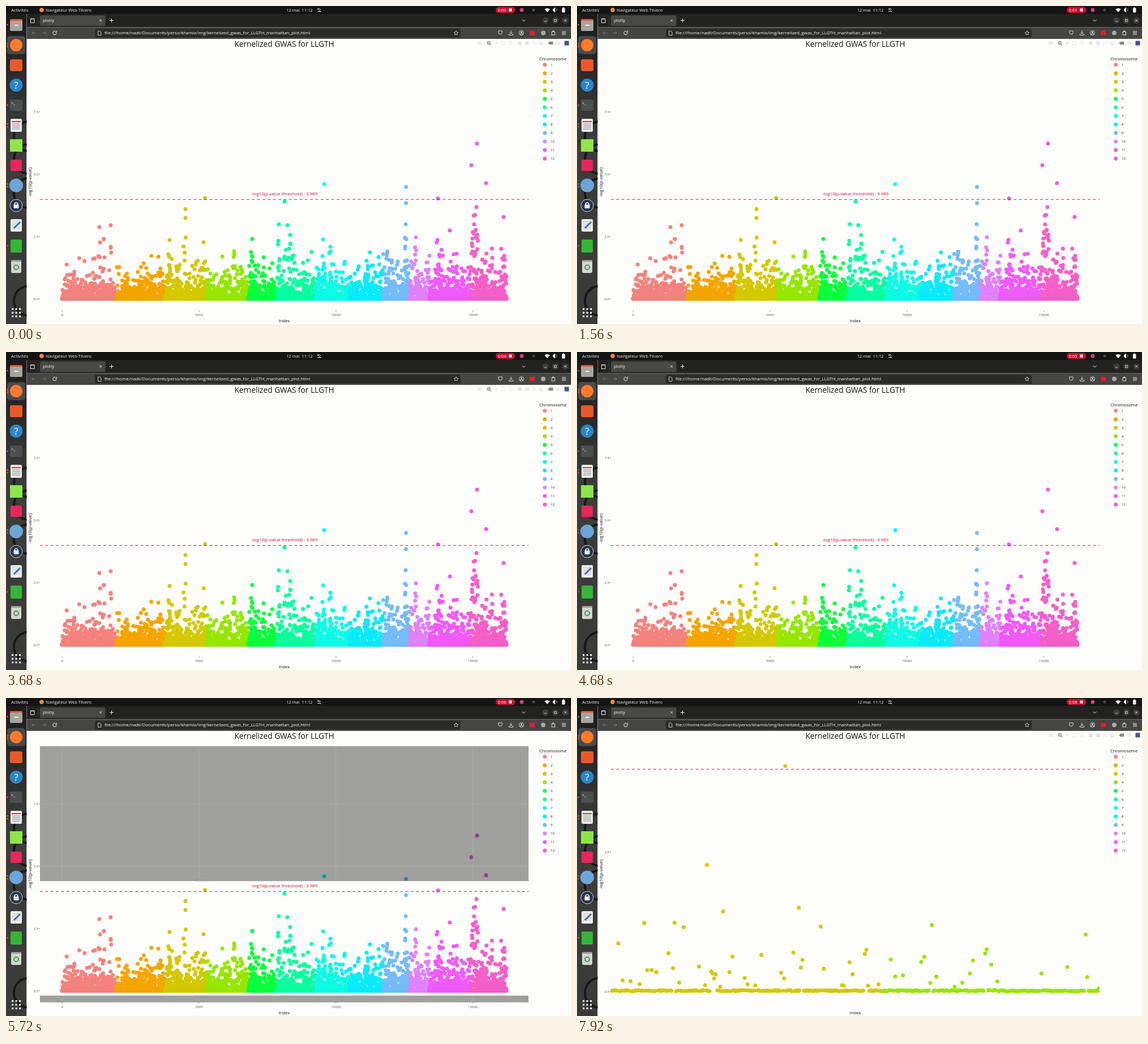
Write an HTML page with a canvas that moves like this. It is 998 px wide and 561 px high and loops after 7990 ms.

```html
<!DOCTYPE html>
<html lang="fr">
<head>
<meta charset="utf-8">
<title>Manhattan plot</title>
<style>
html, body { margin: 0; width: 998px; height: 561px; overflow: hidden; background: #fdfdfb; }
canvas { display: block; }
</style>
</head>
<body>
<canvas id="stage" width="998" height="561"></canvas>
<script>
const W = 998, H = 561, LOOP = 7990;
const SANS = '"Open Sans", "Noto Sans", sans-serif', ARIAL = '"Liberation Sans", Arial, sans-serif';
const PAPER = '#fdfdfb', RED = '#c41432';
const COLORS = ['#f4827d', '#f4a500', '#d4c800', '#96e600', '#0aff3c', '#0aff9f',
  '#0ffae6', '#0aebfa', '#73bdf8', '#e182fa', '#f05afa', '#f55fc8'];
const PLOT = { l: 60, t: 85, r: 923, b: 537 };

// Data: x is measured in overview pixels, v is -log10(p)
const EDGES = [99, 195, 281, 354.6, 428, 478, 548, 607, 666, 713, 748, 820, 885];
const MARKERS = 16260, THRESHOLD = 3.989;
const PEAKS = [[165, 2.88], [185, 2.95], [173, 2.4], [289, 2.36], [317, 3.6], [317, 3.24],
  [351.53, 4.047], [403, 1.9], [435, 2.4], [482, 2.99], [492, 3.9], [497, 2.95], [502, 2.56],
  [562, 4.6], [706.5, 4.49], [706.5, 3.84], [706, 2.99], [724, 2.47], [763, 4.03], [784, 2.74],
  [822, 5.36], [832, 6.23], [848, 4.64], [831, 3.68], [879, 3.28]];

// The two views on the data, and the band dragged between them
const OVERVIEW = { x: x => x, y: v => 516.5 - v * 43.95 };
const ZOOMED = { x: x => 60 + (x - 346) * 55.7, y: v => 517.4 - v * 98.2 };
const BAND = { l: 346, r: 361.5, t: 323 };
const DRAG = [[4830, 396], [4890, 432], [5060, 478], [5300, 511], [5540, 518], [5710, 525]];

let g;

function layer(paint) {
  const c = document.createElement('canvas');
  c.width = W; c.height = H;
  g = c.getContext('2d');
  paint();
  return c;
}
function rect(x, y, w, h, color, r = 0) {
  g.fillStyle = color;
  g.beginPath(); g.roundRect(x, y, w, h, r); g.fill();
}
function dot(x, y, color, r = 3.5) {
  g.fillStyle = color;
  g.beginPath(); g.arc(x, y, r, 0, 7); g.fill();
}
function ring(x, y, r, color, w = 1, from = 0, to = 2 * Math.PI) {
  g.strokeStyle = color; g.lineWidth = w;
  g.beginPath(); g.arc(x, y, r, from, to); g.stroke();
}
function line(color, w, ...p) {
  g.strokeStyle = color; g.lineWidth = w;
  g.beginPath();
  for (let i = 0; i < p.length; i += 2) g.lineTo(p[i], p[i + 1]);
  g.stroke();
}
function polygon(fill, stroke, points) {
  g.fillStyle = fill; g.strokeStyle = stroke; g.lineWidth = .6;
  g.beginPath();
  for (const [x, y] of points) g.lineTo(x, y);
  g.closePath(); g.fill(); g.stroke();
}
function cross(x, y, r) {
  line('#eee', .9, x - r, y - r, x + r, y + r);
  line('#eee', .9, x + r, y - r, x - r, y + r);
}
function text(s, x, y, size, color, align = 'left', font = SANS) {
  g.font = `${size}px ${font}`;
  g.textAlign = align; g.fillStyle = color;
  g.fillText(s, x, y);
}
function randomizer(seed) {
  return () => (seed = (seed * 16807) % 2147483647) / 2147483647;
}

// Most markers lie at zero; the rest decay exponentially, varying from place to place
function makeData() {
  const rnd = randomizer(4711), points = [];
  const add = (x, v) => points.push({ x, v, chr: EDGES.findIndex(e => e > x) - 1 });
  const local = Array.from({ length: 160 }, () => .55 + .8 * rnd());
  for (let i = 0; i < MARKERS; i++) {
    const x = 99 + i * 785 / MARKERS;
    const spread = (.32 + .02 * x / 99) * local[(x - 99) / 5 | 0];
    const v = rnd() < .84 ? rnd() * .02 : -Math.log(1 - rnd()) * spread;
    add(x, v < 2.1 ? v : 0);
  }
  for (const [x, top] of PEAKS) {
    add(x, top);
    for (let i = 0; i < 4; i++) add(x + 5 * (rnd() - .5), Math.min(top, 2.5) * rnd());
  }
  for (let i = 0; i < 16; i++) add(822 + 11 * rnd(), 1.6 + 1.9 * rnd());
  return points.sort((a, b) => a.chr - b.chr);
}

function paintDock() {
  g.save();
  g.beginPath(); g.rect(0, 14, 36.5, H); g.clip();
  const bg = g.createLinearGradient(0, 14, 0, H);
  bg.addColorStop(0, '#1c1a1a'); bg.addColorStop(.4, '#3c3d3a'); bg.addColorStop(1, '#3a3b38');
  rect(0, 14, 36.5, H, bg);
  for (const y of [230, 270, 330, 520]) ring(40, y, 26, '#161618', 4);
  rect(2, 53, 32, 32, '#4a4a4c', 5);
  g.restore();

  rect(7, 23, 22, 9, '#e2583a', 2); rect(7, 26, 22, 18, '#a8a5a0', 2); rect(15, 33, 7, 2, '#f2f2f2');
  dot(18, 69, '#ff7a2b', 11);
  rect(7, 94, 22, 21, '#e95a2b', 3);
  dot(18, 139.5, '#2a86c8', 11.5); text('?', 18, 145.5, 17, '#fff', 'center');
  rect(7, 165, 22, 20, '#4c4f50', 2); text('>_', 9, 174, 7, '#fff');
  rect(8, 199, 20, 23, '#ececec', 2); rect(10, 203, 16, 2, '#d33c3c');
  for (let y = 208; y < 220; y += 3) line('#8b8b8b', 1, 11, y, 25, y);
  rect(7, 235, 22, 22, '#8ee64a', 1);
  rect(8, 271, 20, 20, '#e8265c', 2);
  dot(18, 316.5, '#6da5d8', 12);
  dot(18, 352, '#27364f', 11.5); ring(18, 352, 11, '#d8dce2');
  ring(18, 350, 3, '#eee', 1.5, Math.PI, 0); rect(13.5, 350, 9, 7, '#eee', 1);
  rect(8, 376, 20, 22, '#eeeeec', 2);
  for (let y = 380; y < 395; y += 3) line('#bbb', .8, 11, y, 25, y);
  line('#3a6fc4', 3, 14, 392, 25, 381);
  rect(8, 412, 20, 23, '#35b635', 2);
  rect(9, 448, 18, 23, '#d5d5d0', 3); rect(9, 448, 18, 3, '#9b9b98', 1);
  ring(18, 461, 4, '#3e9c55', 2);
  for (let i = 0; i < 9; i++) rect(10 + i % 3 * 6.5, 533 + (i / 3 | 0) * 6.5, 3.2, 3.2, '#f3f3f3', .8);
  for (const y of [33, 66, 69, 72, 175, 208, 213, 314, 319, 423]) dot(2.7, y, '#e9562a', 1.3);
}

function paintTopBar() {
  rect(0, 0, W, 14, '#141414');
  text('Activités', 9, 9.7, 7.8, '#f2f2f2');
  dot(63, 7, '#ff8a3c', 3.8);
  text('Navigateur Web Tilvero', 70, 9.7, 7.5, '#f2f2f2');
  text('12 mai  11:12', 495, 9.7, 7.5, '#f2f2f2');
  ring(553, 7, 2.4, '#ddd', 1, Math.PI, 0);
  line('#ddd', 1, 550, 9.5, 556, 9.5); line('#ddd', .8, 550, 3.5, 556.5, 11);
  rect(865, 1.5, 34.5, 11, '#c8102e', 5.5); rect(888.5, 4.5, 5, 5, '#fff');
  dot(911, 7, '#d93a8c', 3.5);
  dot(932, 7, '#4a4a4a', 2.5);
  g.fillStyle = '#f2f2f2';
  g.beginPath(); g.moveTo(956, 11); g.arc(956, 11, 7, -2.3, -.84); g.fill();
  g.beginPath(); g.moveTo(966, 5.5); g.lineTo(970, 2.5); g.lineTo(970, 11.5); g.lineTo(966, 8.5); g.fill();
  ring(970, 7, 3, '#bbb', 1, -.9, .9);
  rect(982, 3.5, 5.5, 8, '#f2f2f2', 1); rect(983.5, 2.5, 2.5, 1.5, '#f2f2f2');
}

function paintBrowser() {
  rect(36.5, 14, W, 23.5, '#222221');
  rect(60, 16.5, 115.5, 18.5, '#484846', 2.5);
  line('#5c5c5a', .7, 57, 19, 57, 33);
  line('#e6e6e8', 1, 43, 22.5, 50, 22.5);
  g.strokeRect(43.5, 23, 6.5, 6.5);
  text('plotly', 65, 28.2, 7.8, '#fbfbfe');
  cross(167, 25.5, 2);
  line('#eee', 1, 183, 25.5, 190, 25.5); line('#eee', 1, 186.5, 22, 186.5, 29);
  line('#eee', 1, 911.5, 24, 914.5, 27, 917.5, 24);
  for (const x of [953, 970.5, 988]) dot(x, 25.5, '#3e3e3d', 5.5);
  line('#eee', .8, 951, 27, 955, 27); g.strokeRect(968.7, 23.8, 3.5, 3.5); cross(988, 25.5, 1.8);

  rect(36.5, 37.5, W, 20.5, '#454543');
  for (const [x, d] of [[49, -1], [67, 1]]) {
    line('#777775', 1, x - 3.5, 47.5, x + 3.5, 47.5);
    line('#777775', 1, x + d * .5, 44.5, x + d * 3.5, 47.5, x + d * .5, 50.5);
  }
  ring(86, 47.5, 3.2, '#eee', 1, 0, 5.2); line('#eee', 1, 89.4, 43.5, 89.4, 46.2, 86.8, 46.2);
  rect(157, 40, 646, 15.5, '#2a2a29', 2.5);
  line('#ddd', .9, 162.5, 44, 166, 44, 168, 46, 168, 51.5, 162.5, 51.5, 162.5, 44);
  text('file:///home/nadil/Documents/perso/khamix/img/kernelized_gwas_for_LLGTH_manhattan_plot.html',
    174, 50.3, 7.85, '#fbfbfe');
  const star = [];
  for (let i = 0; i < 11; i++) {
    const a = i * Math.PI / 5 - Math.PI / 2, r = i % 2 ? 1.8 : 4;
    star.push(795 + r * Math.cos(a), 47.7 + r * Math.sin(a));
  }
  line('#ddd', .8, ...star);
  ring(873, 46.5, 3.3, '#ddd', 1, 0, Math.PI); line('#ddd', 1, 869.7, 46.5, 869.7, 44, 876.3, 44, 876.3, 46.5);
  line('#ddd', 1, 892, 43.5, 892, 49, 889.5, 46.8); line('#ddd', 1, 892, 49, 894.5, 46.8);
  line('#ddd', 1, 888.5, 49, 888.5, 51.3, 895.5, 51.3, 895.5, 49);
  ring(910.5, 47.5, 4, '#ddd'); dot(910.5, 46.5, '#ddd', 1.4); ring(910.5, 50.5, 2.2, '#ddd', 1, Math.PI, 0);
  rect(925, 43.5, 9, 8, '#e01f2d', 1.5);
  dot(949, 47.5, '#a9a9a9', 4);
  g.strokeRect(964, 45.5, 5.5, 5.5); dot(966.5, 44.7, '#ddd', 1.5);
  for (const y of [45, 47.5, 50]) line('#eee', 1, 982, y, 989, y);
}

function paintFrame() {
  rect(0, 0, W, H, PAPER);
  paintDock();
  paintTopBar();
  paintBrowser();
  text('Kernelized GWAS for LLGTH', 491.5, 71.7, 13.7, '#111', 'center');
  text('Index', 491.5, 557.6, 7.6, '#111', 'center');
  g.save();
  g.translate(45.3, 311); g.rotate(-Math.PI / 2);
  text('-log10(p-value)', 0, 0, 7.6, '#111', 'center');
  g.restore();
  text('Chromosome', 942, 96, 7.6, '#111');
  COLORS.forEach((c, i) => {
    const y = 103.6 + i * 15.05;
    dot(951.7, y, c, 3.4);
    text(i + 1, 962, y + 2.3, 6.1, '#222');
  });
}

function paintModebar() {
  const faint = '#e4e4e6', dark = '#8b8b8e';
  rect(833.5, 63, 7, 5, faint, 1); dot(837, 65.5, PAPER, 1.4);
  ring(852.7, 65, 2.7, dark, 1.2); line(dark, 1.3, 854.7, 67, 857, 69.3);
  line(dark, .8, 851.2, 65, 854.2, 65); line(dark, .8, 852.7, 63.5, 852.7, 66.5);
  line(faint, 1, 862.5, 65.5, 869.5, 65.5); line(faint, 1, 866, 62, 866, 69);
  g.setLineDash([1.5, 1]); g.strokeRect(875.5, 62.5, 6, 6); g.setLineDash([]);
  ring(891.5, 65, 3, faint);
  rect(904.5, 62.5, 6.5, 6.5, faint, 1); rect(917, 62.5, 6.5, 6.5, faint, 1);
  line(faint, 1, 929, 62, 935.5, 69); line(faint, 1, 935.5, 62, 929, 69);
  line(faint, 1.2, 941, 66, 945, 62.5, 949, 66); rect(942.5, 66, 5, 3, faint);
  polygon(dark, dark, [[957.5, 65.5], [960, 63], [966, 63], [966, 68], [960, 68]]);
  rect(971, 63, 7.5, 2, faint); rect(971, 66, 7.5, 2, faint);
  rect(986.5, 61.5, 8, 8, '#46548a', 1);
}

function paintPlot(view, ticks) {
  g.save();
  g.beginPath(); g.rect(PLOT.l, PLOT.t, PLOT.r - PLOT.l, PLOT.b - PLOT.t); g.clip();
  for (const p of data) dot(view.x(p.x), view.y(p.v), COLORS[p.chr]);
  g.setLineDash([4.68, 4.68]);
  line(RED, 1.1, PLOT.l, view.y(THRESHOLD), PLOT.r, view.y(THRESHOLD));
  g.restore();
  for (const v of ticks) {
    const y = view.y(v);
    text(v.toFixed(1), 57, y + 2.2, 6.1, '#555', 'right');
    line('#444', .7, 58, y, 60, y);
  }
}

function paintOverview() {
  paintPlot(OVERVIEW, [0, 2.5, 5, 7.5]);
  text('-log10(p-value threshold) : 3.989', 491.7, 334.3, 7.83, RED, 'center');
  for (let i = 0; i < 4; i++) {
    const x = 99.3 + i * 241.8;
    line('#444', .7, x, 537, x, 539);
    text(i * 5000, x, 547, 6.1, '#555', 'center');
  }
}

function drawTooltip() {
  polygon('#d1c80a', '#555', [[354, 339], [357.3, 336], [357.3, 319.7], [446.3, 319.7],
    [446.3, 357.8], [357.3, 357.8], [357.3, 342]]);
  ['-log10(p_value) :  4.047', 'MkID :  D03_35321315', 'Position in Kb : 35321.315', 'Chromosome number :  3']
    .forEach((s, i) => text(s, 361, 328 + i * 8.8, 6.76, '#444', 'left', ARIAL));
}

function drawSelection(t) {
  const bottom = DRAG.filter(d => d[0] <= t).pop()[1];
  const boxed = t >= 6680;
  const { l, r } = boxed ? BAND : PLOT;
  g.save();
  g.beginPath();
  g.rect(PLOT.l, PLOT.t, PLOT.r - PLOT.l, PLOT.b - PLOT.t);
  g.rect(l, BAND.t, r - l, bottom - BAND.t);
  g.fillStyle = 'rgba(0,0,0,.37)';
  g.fill('evenodd');
  g.clip('evenodd');
  const grid = 'rgba(255,255,255,.13)';
  for (const y of [187, 297, 407]) line(grid, 1, PLOT.l, y, PLOT.r, y);
  for (let x = 99.3; x < PLOT.r; x += 241.8) line(grid, 1, x, PLOT.t, x, PLOT.b);
  g.restore();

  const handle = (...points) => polygon('#fff', '#555', points);
  for (const [y, dy] of [[BAND.t, -1], [bottom, 1]]) {
    const near = y + dy * .3, far = y + dy * 1.8;
    if (!boxed) handle([335.3, near], [335.3, far], [356.7, far], [356.7, near]);
    else for (const [x, dx] of [[l, -1], [r, 1]]) {
      const inner = x + dx * .3, outer = x + dx * 1.8;
      handle([inner, near - dy * 5.2], [outer, near - dy * 5.2], [outer, far],
        [inner - dx * 5.2, far], [inner - dx * 5.2, near], [inner, near]);
    }
  }
}

const data = makeData();
const base = layer(paintFrame), modebar = layer(paintModebar);
const overview = layer(paintOverview), zoomed = layer(() => paintPlot(ZOOMED, [0, 2.5]));
const stage = document.getElementById('stage').getContext('2d');
const start = performance.now();

function draw() {
  const t = (performance.now() - start) % LOOP;
  const isZoomed = t >= 7920;
  g = stage;
  g.drawImage(base, 0, 0);
  text('0:0' + Math.floor((t + 320) / 1000), 868.5, 9.7, 7.6, '#fff');
  if (t < 4560 || isZoomed) g.drawImage(modebar, 0, 0);
  g.drawImage(isZoomed ? zoomed : overview, 0, 0);
  if (t >= 1940 && t < 3680) drawTooltip();
  if (t >= 4830 && !isZoomed) drawSelection(t);
  requestAnimationFrame(draw);
}
draw();
</script>
</body>
</html>
```
